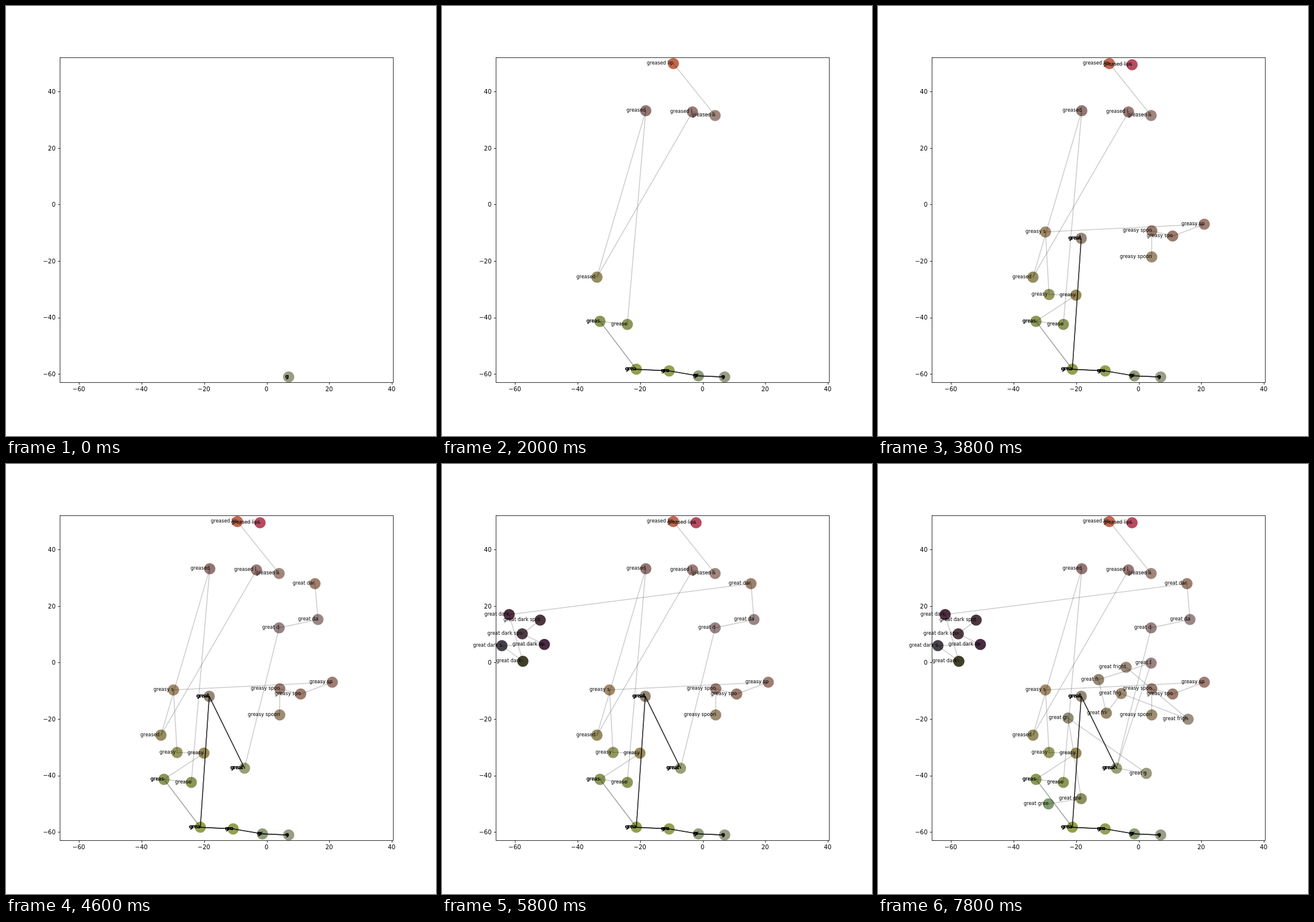
Recreate the animation shown at these times as an HTML page with a canvas. Size 720 px wide and 720 px high, loop 8 s.

```html
<!DOCTYPE html>
<html lang="en">
<head>
<meta charset="utf-8">
<title>Word paths</title>
<style>
html, body { margin: 0; width: 100%; height: 100%; overflow: hidden; background: #fff; }
canvas { display: block; }
</style>
</head>
<body>
<canvas id="plot" width="720" height="720"></canvas>
<script>
const ctx = document.getElementById('plot').getContext('2d');
const STEP = 200;
const LOOP = 8000;
const RADIUS = 9.4;
const BOX = { left: 90.5, top: 86.5, right: 648.5, bottom: 630.5 };

// label, x, y, colour; each label hangs on the one that is a letter shorter
const nodes = [
  ['g', 473.3, 621.2, '#9a9d83'],
  ['gr', 429.3, 619.3, '#8f9b78'],
  ['gre', 380.4, 611, '#93a054'],
  ['grea', 325.4, 608.2, '#93a04c'],
  ['greas', 264.5, 528, '#8b9858'],
  ['grease', 310.3, 533.2, '#8d9658'],
  ['greased', 341.2, 175.4, '#937673'],
  ['greased ', 259.5, 454, '#948d5f'],
  ['greased l', 419.4, 177.4, '#9a7a76'],
  ['greased li', 457.3, 183.4, '#a0867c'],
  ['greased lip', 387.4, 96.3, '#c0674f'],
  ['greased lips', 425.4, 98.4, '#b64c60'],
  ['greasy', 331.4, 484.2, '#988a58'],
  ['greasy ', 286.4, 483, '#94975f'],
  ['greasy s', 280.4, 378.3, '#a38a68'],
  ['greasy sp', 546.3, 365.3, '#a07d72'],
  ['greasy spo', 493.4, 385.2, '#9c7c6e'],
  ['greasy spoo', 458.4, 376.3, '#9a7c70'],
  ['greasy spoon', 458.3, 420.2, '#9d8c70'],
  ['great', 340.3, 389, '#938775'],
  ['great ', 399.4, 509.3, '#9a9f76'],
  ['great d', 457.3, 274.3, '#988383'],
  ['great da', 522.3, 260.3, '#9a8686'],
  ['great dar', 517.3, 200.3, '#9c7f6d'],
  ['great dark', 112.4, 252.2, '#4e2f40'],
  ['great dark ', 135.4, 330.3, '#40402a'],
  ['great dark s', 100.3, 304.2, '#46404a'],
  ['great dark sp', 171.4, 302.2, '#492c42'],
  ['great dark spo', 134.4, 284.4, '#513c45'],
  ['great dark spot', 164.4, 261.3, '#4c373f'],
  ['great f', 457.4, 333.3, '#998380'],
  ['great fr', 369.4, 361, '#958774'],
  ['great fri', 382.3, 417.2, '#978969'],
  ['great frig', 407.3, 384.4, '#9c8b73'],
  ['great frigh', 519.3, 427.3, '#9e9080'],
  ['great fright', 415.4, 340.3, '#9b8a79'],
  ['great g', 449.3, 518, '#9c9b80'],
  ['great gr', 318.3, 425.4, '#918d75'],
  ['great gre', 340.3, 560.3, '#8c9060'],
  ['great gree', 285.4, 569.2, '#7f9b6f']
].map(([label, x, y, color]) => ({ label, x, y, color, uses: countUses(label) }));

const byLabel = new Map(nodes.map(n => [n.label, n]));

// How many phrases run through a label; shared paths are drawn once per phrase
function countUses(label) {
  if (label.length < 5) return 9;
  if (label === 'greas') return 2;
  return label.trim() === 'great' ? 7 : 1;
}

function repeat(count, draw) {
  for (let i = 0; i < count; i++) draw();
}

function line(x1, y1, x2, y2) {
  ctx.beginPath();
  ctx.moveTo(x1, y1);
  ctx.lineTo(x2, y2);
  ctx.stroke();
}

function drawDot({ x, y, color }) {
  ctx.fillStyle = color;
  ctx.beginPath();
  ctx.arc(x, y, RADIUS, 0, Math.PI * 2);
  ctx.fill();
}

function drawEdge(node) {
  const from = byLabel.get(node.label.slice(0, -1));
  if (from) repeat(node.uses, () => line(from.x, from.y, node.x, node.y));
}

function drawLabel({ label, x, y, uses }) {
  const left = Math.round(x - ctx.measureText(label).width);
  repeat(uses, () => ctx.fillText(label, left, Math.round(y + 1.8)));
}

function drawAxes() {
  const { left, top, right, bottom } = BOX;
  ctx.strokeStyle = ctx.fillStyle = '#000';
  ctx.lineWidth = 0.8;
  ctx.strokeRect(left, top, right - left, bottom - top);
  ctx.font = '10px "DejaVu Sans", sans-serif';
  for (let v = -60; v <= 40; v += 20) {
    const text = String(v).replace('-', '\u2212');
    const x = 436.6 + v * 5.24;
    const y = 332.3 - v * 4.73;
    const tickX = Math.round(x) + 0.5;
    const tickY = Math.round(y) + 0.5;
    line(tickX, bottom, tickX, bottom + 3.5);
    line(left, tickY, left - 3.5, tickY);
    ctx.textAlign = 'center';
    ctx.fillText(text, x - 0.4, 645);
    ctx.textAlign = 'right';
    ctx.fillText(text, 83, Math.round(y + 3.8));
  }
}

function render(time) {
  const shown = nodes.slice(0, Math.floor((time % LOOP) / STEP) + 1);
  ctx.fillStyle = '#fff';
  ctx.fillRect(0, 0, 720, 720);
  shown.forEach(drawDot);
  drawAxes();
  ctx.strokeStyle = 'rgba(0, 0, 0, 0.2)';
  ctx.lineWidth = 1.5;
  ctx.lineCap = 'square';
  shown.forEach(drawEdge);
  ctx.lineCap = 'butt';
  ctx.fillStyle = '#000';
  ctx.textAlign = 'left';
  ctx.font = '8px "DejaVu Sans", sans-serif';
  shown.forEach(drawLabel);
}

const start = performance.now();
function tick() {
  render(performance.now() - start);
  requestAnimationFrame(tick);
}
tick();
</script>
</body>
</html>
```
